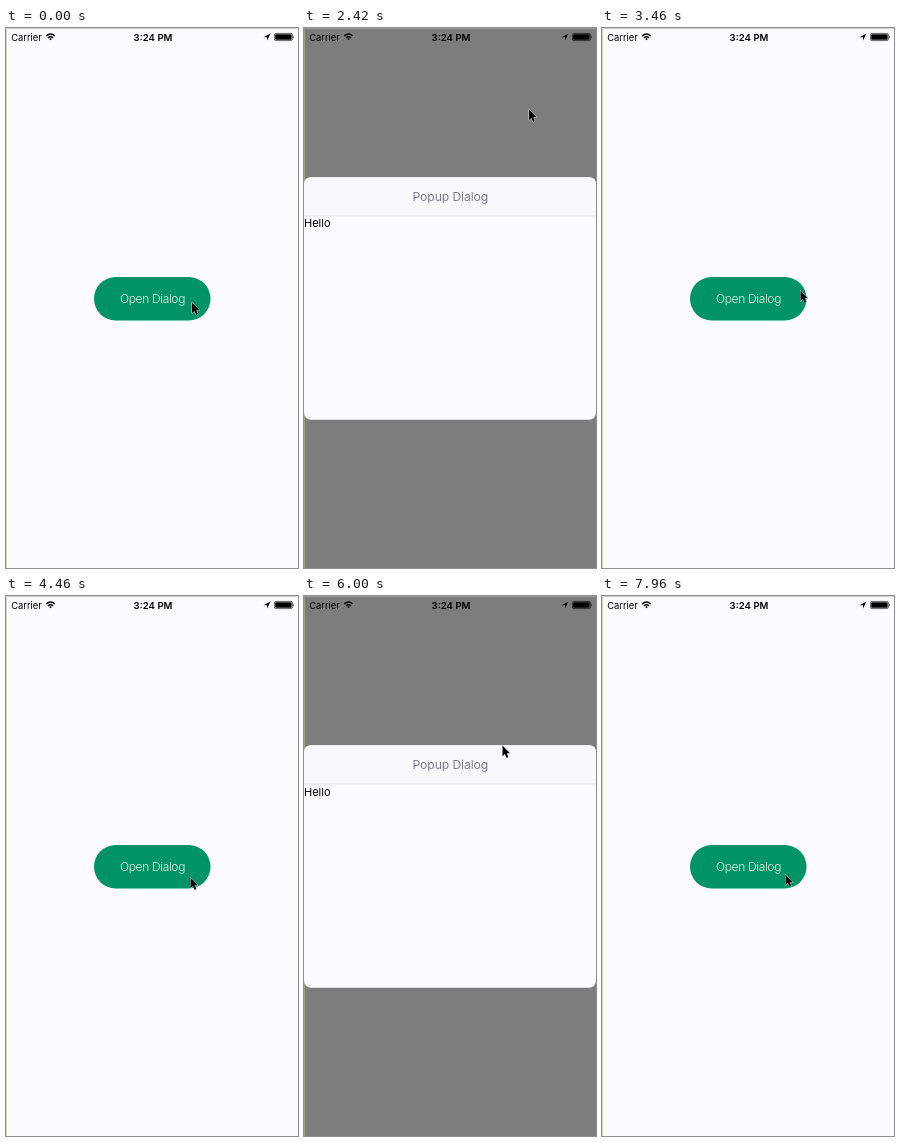
These frames come from a looping animation (292 px wide and 540 px high, 8 s). An HTML page:

```html
<!DOCTYPE html>
<html lang="en">
<head>
<meta charset="utf-8">
<title>Popup dialog</title>
<style>
  html, body { margin: 0; width: 100%; height: 100%; overflow: hidden; background: #fcfcfe; }
  svg { display: block; width: 292px; height: 540px; font-family: Inter, "Open Sans", sans-serif; }
</style>
</head>
<body>
<svg viewBox="0 0 292 540">
  <rect width="292" height="540" fill="#fcfcfe"/>

  <text x="5.3" y="12.7" font-size="9.4" letter-spacing="-.05">Carrier</text>
  <g fill="none" stroke="#000" stroke-width="1.4">
    <path d="M40.2 8.1Q44.5 4 48.8 8.1M41.9 9.9Q44.5 7.5 47.1 9.9"/>
    <path d="M44.5 12.2L43.2 10.9Q44.5 9.8 45.8 10.9Z" fill="#000" stroke="none"/>
  </g>
  <text x="147" y="12.7" font-size="9.6" font-weight="600" text-anchor="middle">3:24 PM</text>
  <path d="M264.5 5.5L257.5 9.2H261V12.5Z"/>
  <rect x="268.4" y="5.4" width="18" height="7.2" rx="1.5" fill="none" stroke="#000" stroke-width=".6"/>
  <rect x="269.2" y="6.2" width="16.4" height="5.6" rx=".7"/>
  <path d="M287 7.6Q288.4 9 287 10.4Z"/>

  <rect x="88" y="249" width="116.5" height="43.5" rx="21.75" fill="#009464"/>
  <text x="146.5" y="275" font-size="12" font-weight="300" letter-spacing="-.35" text-anchor="middle" fill="#e4f4ea">Open Dialog</text>

  <rect id="shade" width="292" height="540"/>
  <path d="M.5 540V.5H292" fill="none" stroke="#b4b49c" stroke-opacity=".6"/>

  <g id="dialog">
    <rect y="149.3" width="292" height="242.4" rx="7" fill="#fcfcfe"/>
    <path d="M0 188V156.3Q0 149.3 7 149.3H285Q292 149.3 292 156.3V188Z" fill="#f9f9fb"/>
    <path d="M0 188H292" stroke="#dad9dc" stroke-width=".7"/>
    <text x="146.3" y="172.8" font-size="12.2" letter-spacing="-.1" text-anchor="middle" fill="#7f7d89">Popup Dialog</text>
    <text x="0" y="199.5" font-size="11">Hello</text>
  </g>

  <path id="cursor" d="M0 0V10.8L2.4 8.5L4.1 12.4L5.9 11.6L4.3 7.8H7.6Z" stroke="#fff" stroke-opacity=".8" paint-order="stroke"/>
</svg>
<script>
const LOOP = 8000;
const FADE = 300, SHRINK = 200;
// Times at which the shade and the dialog start to appear, and when both leave.
const popups = [
  { fade: 1185, show: 1190, hide: 2680 },
  { fade: 4500, show: 4573, hide: 6392 },
];
// Cursor stops: time, x, y.
const stops = [
  [0, 186, 274.5], [830, 189.3, 275.5], [1750, 189.3, 275.5], [2380, 225, 81.5],
  [2780, 225, 81.5], [3460, 198.5, 262.5], [4250, 184.5, 281.5], [5540, 184.5, 281.5],
  [6250, 204, 97.5], [6640, 204, 97.5], [7210, 184, 264], [7960, 183.5, 278.5], [LOOP, 183.5, 278.5],
];
const [shade, dialog, cursor] = ["shade", "dialog", "cursor"].map(id => document.getElementById(id));

const clamp = u => Math.min(1, Math.max(0, u));
const easeInOut = u => u < .5 ? (2 * u) ** 1.7 / 2 : 1 - (2 - 2 * u) ** 1.7 / 2;
const ramp = (t, start, length) => easeInOut(clamp((t - start) / length));
const smooth = u => u * u * (3 - 2 * u);

function spring(ms) {
  if (ms <= 0) return 0;
  const s = ms / 1000, decay = 11, freq = 10.45;
  return 1 - Math.exp(-decay * s) * (Math.cos(freq * s) + decay / freq * Math.sin(freq * s));
}

function cursorAt(t) {
  const i = stops.findIndex(stop => stop[0] > t);
  const [t0, x0, y0] = stops[i - 1], [t1, x1, y1] = stops[i];
  const u = smooth((t - t0) / (t1 - t0));
  return [x0 + (x1 - x0) * u, y0 + (y1 - y0) * u];
}

function draw(t) {
  let scale = 0, dim = 0;
  for (const { fade, show, hide } of popups) {
    scale += spring(t - show) * (1 - ramp(t, hide, SHRINK));
    dim += ramp(t, fade, FADE) * (1 - ramp(t, hide, FADE));
  }
  shade.setAttribute("opacity", dim / 2);
  dialog.setAttribute("visibility", scale > .001 ? "visible" : "hidden");
  dialog.setAttribute("transform", `translate(146 270.5) scale(${scale}) translate(-146 -270.5)`);
  cursor.setAttribute("transform", `translate(${cursorAt(t)})`);
}

function tick() {
  draw(performance.now() % LOOP);
  requestAnimationFrame(tick);
}
tick();
</script>
</body>
</html>
```
